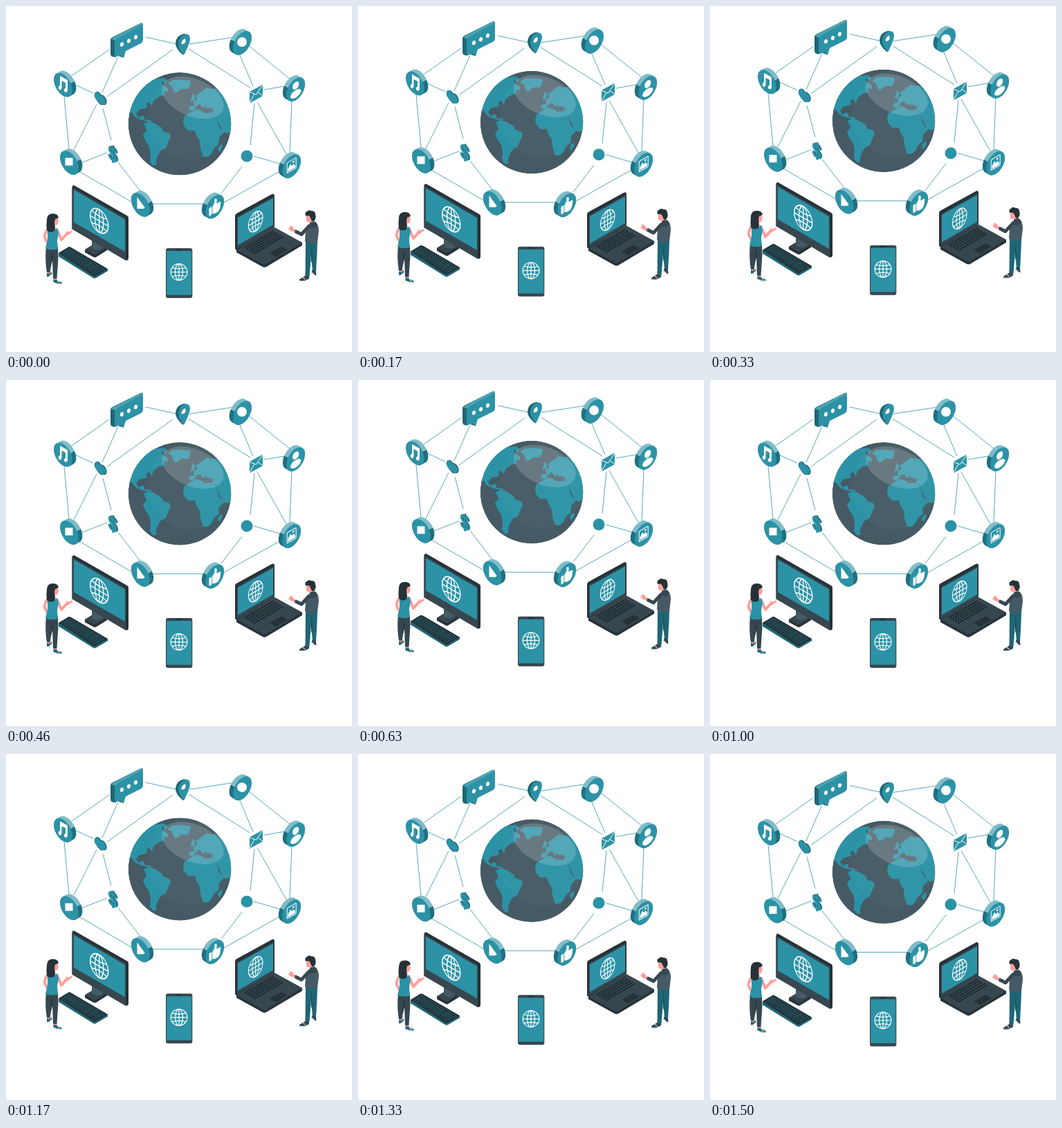
These frames come from a looping animation (500 px wide and 500 px high, 1540 ms). An HTML page:

```html
<!DOCTYPE html>
<html lang="en">
<head>
<meta charset="utf-8">
<title>Connected devices</title>
<style>
  html, body { margin: 0; width: 100%; height: 100%; overflow: hidden; background: #fff; }
  svg { display: block; width: 100%; height: 100%; }
  .teal { fill: #2c92a6; }
  .deep { fill: #1f6674; }
  .slate { fill: #455a64; }
  .dark { fill: #37474f; }
  .ink { fill: #263238; }
  .skin { fill: #ff9f9b; }
  .white { fill: #fff; }
  .wire { fill: none; stroke: #fff; stroke-width: 1.5; }
  .limb { fill: none; stroke-linecap: round; stroke-linejoin: round; }
</style>
</head>
<body>
<svg viewBox="0 0 500 500">
  <defs>
    <linearGradient id="rim" gradientUnits="userSpaceOnUse" x1="-11" y1="-11" x2="11" y2="11">
      <stop offset=".6" stop-color="#7fbcc8"/>
      <stop offset=".6" stop-color="#1f6f7f"/>
    </linearGradient>
    <g id="coin" transform="matrix(.866 .5 0 1 0 0)">
      <path d="M0 0L6.3-6.2" stroke="url(#rim)" stroke-width="31" stroke-linecap="round"/>
      <circle r="15.5" class="teal"/>
    </g>
    <g id="web" class="wire">
      <circle r="15"/>
      <ellipse rx="7" ry="15"/>
      <path d="M0-15V15M-15 0H15M-12.5-8Q0-4 12.5-8M-12.5 8Q0 4 12.5 8"/>
    </g>
    <clipPath id="disc"><circle cx="251" cy="170.3" r="74.3"/></clipPath>
  </defs>

  <g id="scene">
    <!-- network -->
    <path fill="none" stroke="#2c92a6" stroke-width=".8" d="M202 45L247 55M149 63L95 101M162 73L139 125M100 114L126 126M84 130L91 206M131 142L98 208M140 148L152 194M146 212L108 227M162 226L196 270M104 238L183 284M212 286H287M311 271L341 232M315 284L397 238M358 217L396 228M353 201L359 141M363 139L405 214M373 121L402 116M413 136L410 212M337 69L357 116M350 57L411 106M265 55L327 45.500M264 62L353 118M241 63L146 131"/>

    <!-- earth -->
    <g clip-path="url(#disc)">
      <circle cx="251" cy="170.3" r="74.3" class="slate"/>
      <g class="teal">
        <path d="M172 165L180 150Q186 122 212 106L228 104 233 107 231 112 225 109 226 114 234 119 234 124 228 123 229 129 221 131 213 137 211 145 207 139 203 141 204 147 196 149 192 150 188 156 192 161 197 158 200 160 200 164 208 165 212 167 205 167 200 166 193 164 186 160 181 153Z"/>
        <path d="M234 112L241 107Q254 106 267 108L266 114 263 120 253 120 247 125 243 125 240 116Z"/>
        <path d="M199 170L206 167 213 169 219 172 225 176 227 181 236 184Q240 188 235 195L231 205 224 209 220 215 217 222 217 230 212 230 208 224 209 213 207 203 201 194 198 186 203 180Z"/>
        <path d="M258 159L266 154 275 149 284 151 287 155 299 154 304 160 307 173 312 180 318 180 308 190 307 200 300 206 297 213 292 218 285 218 281 206 280 195 275 187 273 180 263 180 257 173 256 166Z"/>
        <path d="M265 151L265 145 272 144 271 138 277 134 274 130 282 124 290 118 297 120 303 119 330 145 330 180 319 184 313 181 306 166 303 158 298 154 299 149 292 147 287 150 280 142 276 144 271 151Z"/>
        <path d="M306 207Q307 201 313 200Q313 207 308 211Z"/>
        <path d="M268 133L270 126 273 130 272 136 266 138Z"/>
      </g>
      <path class="slate" d="M280 147L285 149 287 145 291 148 299 149 298 153 292 152 289 149 287 153 282 152Z"/>
      <circle cx="266" cy="160" r="62" class="white" opacity=".025"/>
      <ellipse cx="270" cy="132.500" rx="47" ry="27" transform="rotate(22 270 132.500)" class="white" opacity=".17"/>
    </g>

    <!-- speech bubble -->
    <path class="deep" d="M151 50Q151 46 154 45L194 25Q198 23 198 28L158 74 153 73Q151 72 151 69Z"/>
    <path fill="#4ba3b4" d="M152 47L194 25Q197 23 198 27L157 50Z"/>
    <path class="teal" d="M157 52Q157 49 160 47L195 28Q198 27 198 30V49Q198 52 195 54L173 65 170 75 165 70 160 73Q157 74 157 71Z"/>
    <path class="deep" d="M162 72L165 70 170 75Z"/>
    <g class="white">
      <ellipse cx="167.500" cy="55.500" rx="2.500" ry="3.200" transform="rotate(20 167.500 55.500)"/>
      <ellipse cx="177.500" cy="50.500" rx="2.500" ry="3.200" transform="rotate(20 177.500 50.500)"/>
      <ellipse cx="187.500" cy="45" rx="2.500" ry="3.200" transform="rotate(20 187.500 45)"/>
    </g>

    <!-- pin -->
    <path class="deep" d="M256 71Q245 62 245 54Q246 42 258 40L262 42Z"/>
    <path fill-rule="evenodd" class="teal" d="M257 71Q249 62 249 55Q250 44 258 41Q266 39 266 48Q265 56 257 71ZM257 47Q252 51 253 55Q255 57 259 53Q262 47 257 47Z"/>
    <path class="white" d="M258 47Q253 50 253.500 55Q256 56 259 53Q261 48 258 47Z"/>

    <!-- heart, dollar, bird stand-in -->
    <path class="deep" d="M137 128Q135 123 130 124Q126 127 129 133Q132 139 137 143L143 143Q147 141 145 135Q142 128 137 128Z"/>
    <path class="teal" d="M136 129Q134 124 130 124.500Q126 127 129 133Q132 138 139 143Q146 142 144 136Q140 128 136 129Z"/>
    <g font-family="'Liberation Sans', Arial, sans-serif" font-weight="700" font-size="29" text-anchor="middle" stroke-width="1">
      <text class="deep" stroke="#1f6674" transform="matrix(.8 .5 0 1 155.500 223.500)">$</text>
      <text class="teal" stroke="#2c92a6" transform="matrix(.8 .5 0 1 154 224)">$</text>
    </g>
    <circle cx="348" cy="217" r="8.500" class="teal"/>

    <!-- envelope -->
    <path class="teal" d="M352 124L371 113.500V130L352 140.500Z"/>
    <path fill="none" stroke="#fff" stroke-width="1" d="M352 124.500L361.500 128 371 114M352 140L359 127.500M371 129.500L364 125"/>

    <!-- badges -->
    <use href="#coin" x="82.500" y="114"/>
    <use href="#coin" x="91.500" y="226.500"/>
    <use href="#coin" x="194.300" y="287.300"/>
    <use href="#coin" transform="translate(341.500 53.500) scale(-1 1)"/>
    <use href="#coin" transform="translate(418.700 120.500) scale(-1 1)"/>
    <use href="#coin" transform="translate(412.700 231.500) scale(-1 1)"/>
    <use href="#coin" transform="translate(301.700 290) scale(-1 1)"/>
    <g class="white">
      <path d="M78 101L89 107V122Q88 126 85 124Q82 121 86 118.500V111L80.500 108V118Q80 122 77 121Q74 117 78 114.500Z"/>
      <rect x="85.500" y="219.500" width="11" height="11"/>
      <path d="M189.500 276L200.500 291Q200 293 198 293L189.500 293Z"/>
      <circle cx="341" cy="52" r="7"/>
    </g>
    <g transform="matrix(.866 -.5 0 1 418.700 120.500)" class="white">
      <circle cy="-5.500" r="5.300"/>
      <path d="M-9 7Q-8 1 0 1Q8 1 9 7Q6 12 0 12Q-6 12-9 7Z"/>
    </g>
    <g transform="matrix(.866 -.5 0 1 412.700 230.500)">
      <rect x="-7.500" y="-7.500" width="15" height="15" rx="1" class="wire" style="stroke-width:1.200"/>
      <path class="white" d="M-6 6V2L-2-3 1 1 3-1 6 3V6Z"/>
      <circle cx="3" cy="-4" r="1.500" class="white"/>
    </g>
    <g transform="matrix(.866 -.5 0 1 301.700 290)" class="white">
      <rect x="-9.500" y="-2.500" width="4.500" height="11.500" rx=".7"/>
      <path d="M-4-2L-.5-6V-11Q3-12 3.500-8L3-3H8.500Q11-2 9.500 1Q10 3 9 4.500Q9 7 7.500 8Q7 10 5 10H0L-4 8Z"/>
    </g>

    <!-- desktop -->
    <path class="ink" d="M114 352L129 343 146 349V353L130 363Q128 364 125 362L114 356Z"/>
    <path class="dark" d="M114 352L129 343 146 349 130 359Q128 360 125 358Z"/>
    <path class="slate" d="M124 335L140 344V350Q134 356 124 350Z"/>
    <path class="ink" d="M95.500 262Q96 258 99 259.500L175 303Q177 304 177 306V365Q176 369 172 367L95.500 322Z"/>
    <path class="dark" d="M95.500 262L173 306.500V367.500L95.500 322.500Z"/>
    <path class="teal" d="M98 265.500L172 308.500V355L98 312.500Z"/>
    <use href="#web" transform="matrix(.87 .5 0 1.100 134.700 310.500)"/>

    <!-- keyboard -->
    <path class="deep" d="M76 357L90 348.500Q92 347.500 94 349L147 380V383L130 393Q128 394 126 393L76 362Z"/>
    <path class="ink" d="M76 357L90 348.500Q92 347.500 94 349L147 380 129 390.500Q128 391 126 390Z"/>
    <path fill="none" stroke="#1f6674" stroke-width=".7" d="M81 357.500L92 351 142 380 129 387ZM84 356L132 385.500M87 354.500L135 383.500M89.500 352.500L139 382M114 377L125 370M121 381L133 374.500"/>
    <path fill="none" stroke="#1f6674" stroke-width="8" stroke-dasharray=".6 3.200" d="M87 354.500L134 382"/>

    <!-- laptop -->
    <path class="ink" d="M333 352L387 319.500 428 342V346L376 377Q374 378 371 377L333 356Z"/>
    <path class="dark" d="M333 352L387 319.500 428 342 376 373Q374 374 371 373Z"/>
    <path class="slate" d="M341 350L387 323 405 333 359 359Z" opacity=".55"/>
    <path fill="none" stroke="#1d282d" stroke-width="2.600" stroke-dasharray="3 .7" d="M344 350L387 325M347.500 352L390.500 327M351 354L394 329M354.500 356L397.500 331M358 358L401 333"/>
    <path class="ink" d="M381 357L398 347.500 407 352 390 362.500Z"/>
    <path class="ink" d="M331 304Q331 301 333 300L385 271.500Q388 271 388 274V319L334 352Q331 353 331 350Z"/>
    <path class="dark" d="M333.500 305L387 275V319L333.500 351Z"/>
    <path class="teal" d="M335 306L386 277.500V316L335 345.500Z"/>
    <use href="#web" transform="matrix(.69 -.4 0 .92 360.700 311.500)"/>

    <!-- phone -->
    <rect x="231" y="350" width="38.300" height="72" rx="3" class="dark"/>
    <rect x="232.200" y="354" width="36" height="63.500" class="teal"/>
    <path stroke="#1d282d" stroke-width="1.200" d="M246 352H254"/>
    <use href="#web" transform="translate(250 384.500) scale(.79)"/>

    <!-- woman -->
    <path class="skin" d="M59 381H64L65 388H60ZM68 391H73L74 397H69Z"/>
    <path class="dark" d="M58 348L75 348 75.500 364 73.500 394H68L67 365 63.500 385H59Q56 366 58 348Z"/>
    <path class="ink" d="M66 352L67.500 366 65 376Z"/>
    <path class="deep" d="M59 386L63 387 66 384 66.500 387 61 391.500 59 391ZM68.500 395L74 396 81 400 81 402H74L68.500 399Z"/>
    <path fill="none" stroke="#dfe7ea" stroke-width="1.200" d="M59 391.500L62 391.500 67 387M68.500 399.500L75 401.500H82M74 396L77 400"/>
    <path class="limb" stroke="#ff9f9b" stroke-width="4" d="M59 324Q55 331 56 335L62 346M74 324L80 338 88 329"/>
    <path class="skin" d="M86 329L88 324 89 327 95 324.500 96.500 326 90 331 87 332Z"/>
    <path class="skin" d="M69 304H74L76 311 74 316 70 317 73 324 66 326Z"/>
    <path class="teal" d="M60 323L67 325 74 321 76 328 74 339 75 351Q65 354 57 350L60 338Z"/>
    <path class="ink" d="M59 309Q59 300 68 300Q75 300 76 306L71 308 70 313 71 320 70 325Q64 329 59 324Q58 317 59 309Z"/>

    <!-- man -->
    <path class="skin" d="M443 378H448V386H443ZM432 386H437V394H432Z"/>
    <path class="deep" d="M433 340H450L449.500 357 448 384H443L441 360 438.500 391H432.500Z"/>
    <path fill="#174f5a" d="M441 344L443 365 441 372Z"/>
    <path class="dark" d="M438 391L432 390 424 395 424.500 398H431L438 395ZM443 381L448 384 448.500 389 446 389 441 385Z"/>
    <path fill="none" stroke="#dfe7ea" stroke-width="1.100" d="M424 397.500H431L438 394.500M429 392L432 395M441 384L446 389"/>
    <path class="skin" d="M434 302H444L446 313 441 318 439 312Q434 313 434 309Z"/>
    <path class="slate" d="M437 317L446 311Q452 315 452 325L450 342Q440 345 432 340L433 325Z"/>
    <path class="limb" stroke="#37474f" stroke-width="5" d="M438 318L427 330 419 326"/>
    <path class="dark" d="M439 313Q448 309 450 317Q445 324 438 319Z"/>
    <path class="skin" d="M418 327L411 325 407.500 321 410 321 410 318 413 318 417 323Z"/>
    <path class="ink" d="M433 303Q431 298 435 297Q437 294 441 296Q447 296 447 301Q449 306 445 311L442 311 440 306 438 303Z"/>
  </g>
</svg>
<script>
  const LOOP = 1540, STEPS = 37, LIFT = 10;
  const scene = document.getElementById("scene");

  // Linear rise and fall, sampled at 24 steps per second.
  function draw() {
    const step = Math.floor(performance.now() % LOOP / LOOP * STEPS + 0.1) % STEPS;
    const phase = (step + 0.96) / STEPS;
    const rise = 1 - Math.abs(1 - 2 * phase);
    scene.setAttribute("transform", `translate(0 ${0.5 - LIFT * rise})`);
    requestAnimationFrame(draw);
  }
  draw();
</script>
</body>
</html>
```
